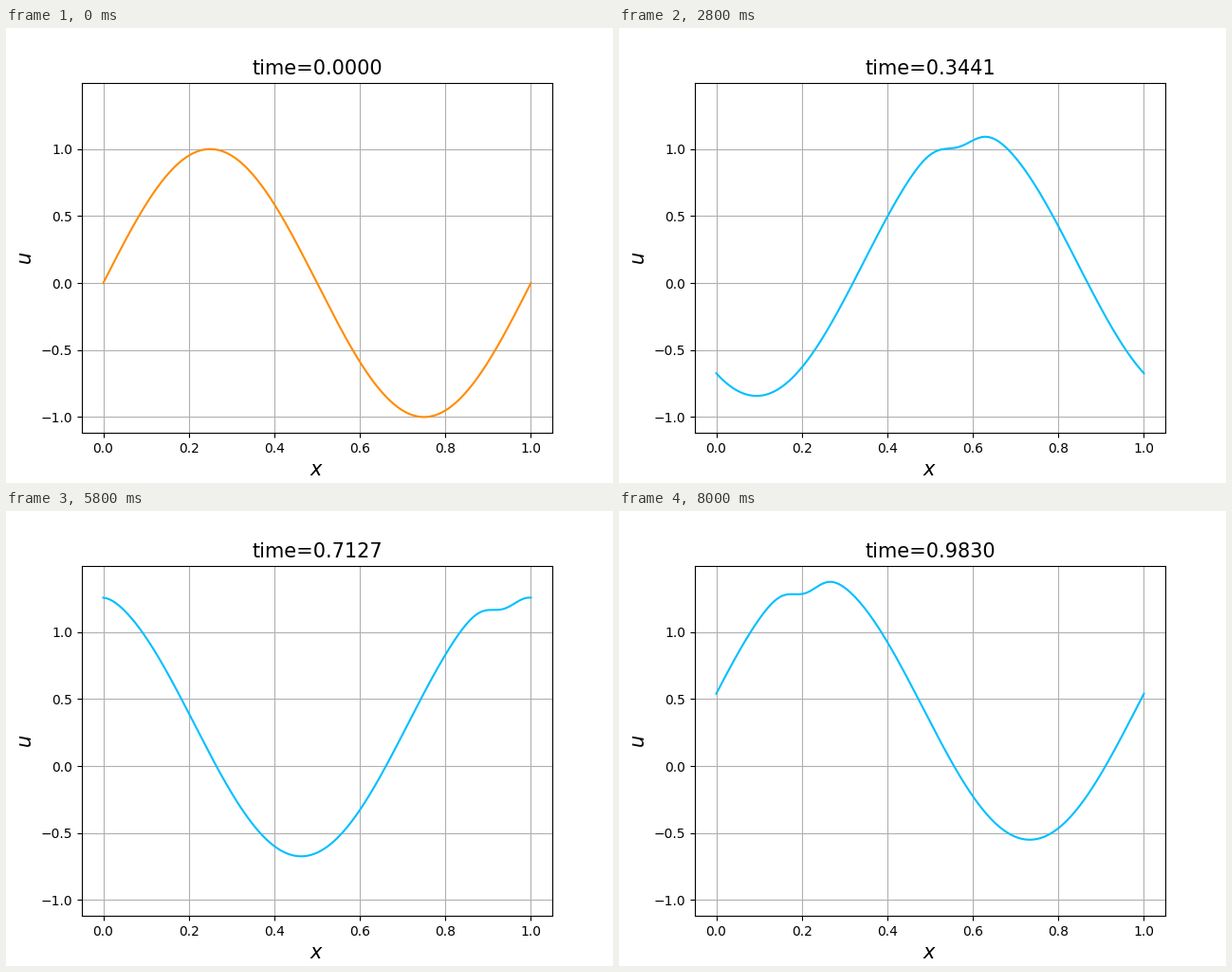
A matplotlib script for the animation above (8200 ms loop, 640 px wide and 480 px high).

```python
import numpy as np
import matplotlib.pyplot as plt
from matplotlib.animation import FuncAnimation

FRAMES = 41
INTERVAL = 200
DT = 0.024576          # model time between frames
SPEED = 1.0
DRIFT = 0.4425         # uniform growth rate
DAMPING = 0.0154       # slow loss of wave amplitude
DENT_POS = 0.2245      # dent centre in the moving frame

x = np.linspace(0, 1, 301)


def wave(t):
    """Travelling sine that drifts upward and grows a dent near its crest."""
    xi = x - SPEED * t
    base = np.exp(-DAMPING * t) * np.sin(2 * np.pi * xi) + DRIFT * t
    depth = 0.118 * np.tanh(t / 0.125)
    width = 0.032 + 0.014 * np.exp(-t / 0.35)
    dist = (xi - DENT_POS + 0.5) % 1 - 0.5
    return base - depth * np.exp(-0.5 * (dist / width) ** 2)


fig, ax = plt.subplots(figsize=(6.4, 4.8), dpi=100)
ax.set_xlim(-0.05, 1.05)
ax.set_ylim(-1.1189, 1.496)
ax.set_yticks(np.arange(-1, 1.1, 0.5))
ax.set_xlabel("$x$", fontsize=15)
ax.set_ylabel("$u$", fontsize=15)
ax.grid(True)
line, = ax.plot(x, wave(0))
title = ax.set_title("", fontsize=15)


def update(i):
    t = i * DT
    line.set_ydata(wave(t))
    line.set_color("deepskyblue" if i else "darkorange")
    title.set_text(f"time={t:.4f}")
    return line, title


anim = FuncAnimation(fig, update, frames=FRAMES, interval=INTERVAL,
                     repeat=True, repeat_delay=0, blit=False)
plt.show()
```
